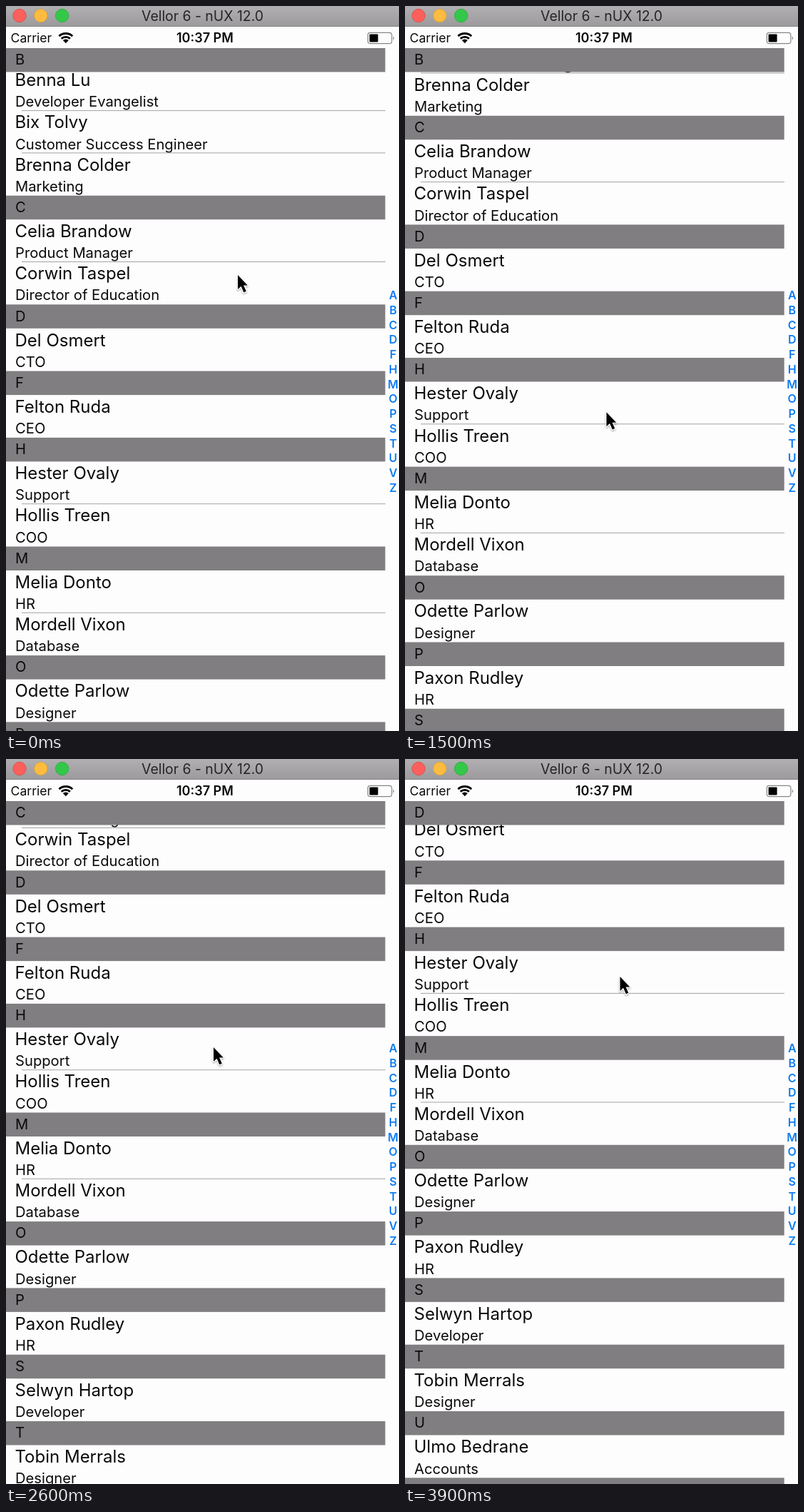
Animation, 551 px wide and 1016 px high, one loop 4 s. Source, as an HTML page:

```html
<!DOCTYPE html>
<html lang="en">
<head>
<meta charset="utf-8">
<title>Contacts</title>
<style>
html, body { margin: 0; width: 100%; height: 100%; overflow: hidden; background: #fefdfe; }
svg { display: block; width: 551px; height: 1016px; font-family: Inter, "Open Sans", sans-serif; font-optical-sizing: none; }
.name { font-size: 24px; fill: #0a0a0a; }
.job, .letter { font-size: 20.2px; fill: #0a0a0a; }
.index { font-size: 16px; font-weight: 600; fill: #0f7cf0; text-anchor: middle; }
</style>
</head>
<body>
<svg viewBox="0 0 551 1016">
  <defs>
    <linearGradient id="bar" x2="0" y2="1">
      <stop offset="0" stop-color="#b1afb1"/>
      <stop offset="1" stop-color="#9c9a9c"/>
    </linearGradient>
    <filter id="shadow" x="-50%" y="-50%" width="200%" height="200%">
      <feDropShadow dx="0" dy="1.5" stdDeviation="1.3" flood-opacity=".35"/>
    </filter>
    <clipPath id="view"><rect y="59" width="551" height="957"/></clipPath>
  </defs>
  <rect width="551" height="1016" fill="#fefdfe"/>
  <g clip-path="url(#view)">
    <g id="cells"></g>
    <g id="heads"></g>
  </g>
  <g id="index"></g>

  <rect width="551" height="28.5" fill="url(#bar)"/>
  <rect y="28" width="551" height="1" fill="#858385"/>
  <g stroke-width=".8">
    <circle cx="19" cy="13.5" r="9.2" fill="#fc605c" stroke="#df4744"/>
    <circle cx="48.8" cy="13.5" r="9.2" fill="#fdbc40" stroke="#de9f34"/>
    <circle cx="78.6" cy="13.5" r="9.2" fill="#34c84a" stroke="#27aa35"/>
  </g>
  <text x="275.5" y="20.7" font-size="19.4" text-anchor="middle" fill="#262426">Vellor 6 - nUX 12.0</text>

  <text x="6.6" y="51" font-size="17.6" fill="#0a0a0a">Carrier</text>
  <g fill="none" stroke="#000" stroke-width="2.9">
    <path d="M74.4 42.2A13.8 13.8 0 0 1 93.2 42.2"/>
    <path d="M77.7 45.8A8.9 8.9 0 0 1 89.9 45.8"/>
  </g>
  <path d="M83.8 52.3L79.8 48.1A5.8 5.8 0 0 1 87.8 48.1Z"/>
  <text x="278.9" y="51" font-size="18" font-weight="600" text-anchor="middle" fill="#0a0a0a">10:37 PM</text>
  <rect x="507.3" y="37.3" width="33.6" height="15.4" rx="3.4" fill="none" stroke="#888" stroke-width="1.2"/>
  <rect x="509.6" y="39.5" width="12" height="11" rx="1"/>
  <path d="M542.8 42.2q2.4 2.8 0 5.6z" fill="#777"/>

  <g id="cursor" filter="url(#shadow)">
    <path d="M0 0V20L4.6 15.7L8.3 24.2L11.8 22.7L8.1 14.4H13.8Z" stroke="#fff" stroke-width="2.2" paint-order="stroke" stroke-linejoin="round"/>
  </g>
</svg>
<script>
const LOOP = 4000, STEP = 100, TOP = 59, HEAD = 34, CELL = 59.3;
const sections = [
  ["B", ["Benna Lu", "Developer Evangelist"], ["Bix Tolvy", "Customer Success Engineer"], ["Brenna Colder", "Marketing"]],
  ["C", ["Celia Brandow", "Product Manager"], ["Corwin Taspel", "Director of Education"]],
  ["D", ["Del Osmert", "CTO"]],
  ["F", ["Felton Ruda", "CEO"]],
  ["H", ["Hester Ovaly", "Support"], ["Hollis Treen", "COO"]],
  ["M", ["Melia Donto", "HR"], ["Mordell Vixon", "Database"]],
  ["O", ["Odette Parlow", "Designer"]],
  ["P", ["Paxon Rudley", "HR"]],
  ["S", ["Selwyn Hartop", "Developer"]],
  ["T", ["Tobin Merrals", "Designer"]],
  ["U", ["Ulmo Bedrane", "Accounts"]],
  ["V"]
];

// [time, top of the first section]
const scroll = [[0, 53.8], [500, -34.8], [1200, -34.8], [1300, -38], [1800, -102.4],
  [2600, -208.2], [3000, -251.9], [3900, -315.5]];
// [time, x, y]
const pointer = [[0, 325, 377], [500, 327.5, 297], [1200, 282, 601], [1800, 283.5, 516.5],
  [2600, 291, 404], [3000, 297, 364.5], [3900, 301.5, 305]];

const $ = id => document.getElementById(id);

function add(parent, tag, attrs, text) {
  const el = document.createElementNS("http://www.w3.org/2000/svg", tag);
  for (const k in attrs) el.setAttribute(k, attrs[k]);
  if (text) el.textContent = text;
  return parent.appendChild(el);
}

// Monotone cubic through the keys, on column c
function curve(keys, t, c) {
  const last = keys.length - 1;
  if (t >= keys[last][0]) return keys[last][c];
  const gap = i => keys[i + 1][0] - keys[i][0];
  const rate = i => (keys[i + 1][c] - keys[i][c]) / gap(i);
  const slope = i => {
    if (i === 0) return rate(0);
    if (i === last) return rate(last - 1);
    const a = rate(i - 1), b = rate(i);
    return a * b <= 0 ? 0 : 2 * a * b / (a + b);
  };
  let i = 0;
  while (t >= keys[i + 1][0]) i++;
  const d = gap(i), u = (t - keys[i][0]) / d, v = 1 - u;
  return v * v * (1 + 2 * u) * keys[i][c] + u * u * (3 - 2 * u) * keys[i + 1][c]
    + d * u * v * (v * slope(i) - u * slope(i + 1));
}

let y = 0;
const heads = sections.map(([letter, ...people]) => {
  const el = add($("heads"), "g", {});
  add(el, "rect", { width: 531.7, height: 33.5, fill: "#807e80" });
  add(el, "text", { class: "letter", x: 13, y: 23.4 }, letter);
  const head = { el, y };
  y += HEAD;
  people.forEach(([name, job], i) => {
    add($("cells"), "text", { class: "name", x: 12.5, y: y + 24.3 }, name);
    add($("cells"), "text", { class: "job", x: 13, y: y + 53.5 }, job);
    y += CELL;
    if (i < people.length - 1)
      add($("cells"), "rect", { x: 22, y: y - 1, width: 510, height: 1, fill: "#a5a3a5" });
  });
  return head;
});

[..."ABCDFHMOPSTUVZ"].forEach((c, i) =>
  add($("index"), "text", { class: "index", x: 542.7, y: 411.3 + i * 20.73 }, c));

const move = (el, x, y) => el.setAttribute("transform", `translate(${x} ${y})`);

function draw(time) {
  const t = Math.floor(time % LOOP / STEP) * STEP;
  const top = curve(scroll, t, 1);
  move($("cells"), 0, top);
  heads.forEach((h, i) => {
    const next = heads[i + 1];
    const pin = next ? Math.min(TOP, top + next.y - HEAD) : TOP;
    move(h.el, 0, Math.max(top + h.y, pin));
  });
  move($("cursor"), curve(pointer, t, 1), curve(pointer, t, 2));
}

const start = performance.now();
function tick() {
  draw(performance.now() - start);
  requestAnimationFrame(tick);
}
tick();
</script>
</body>
</html>
```
